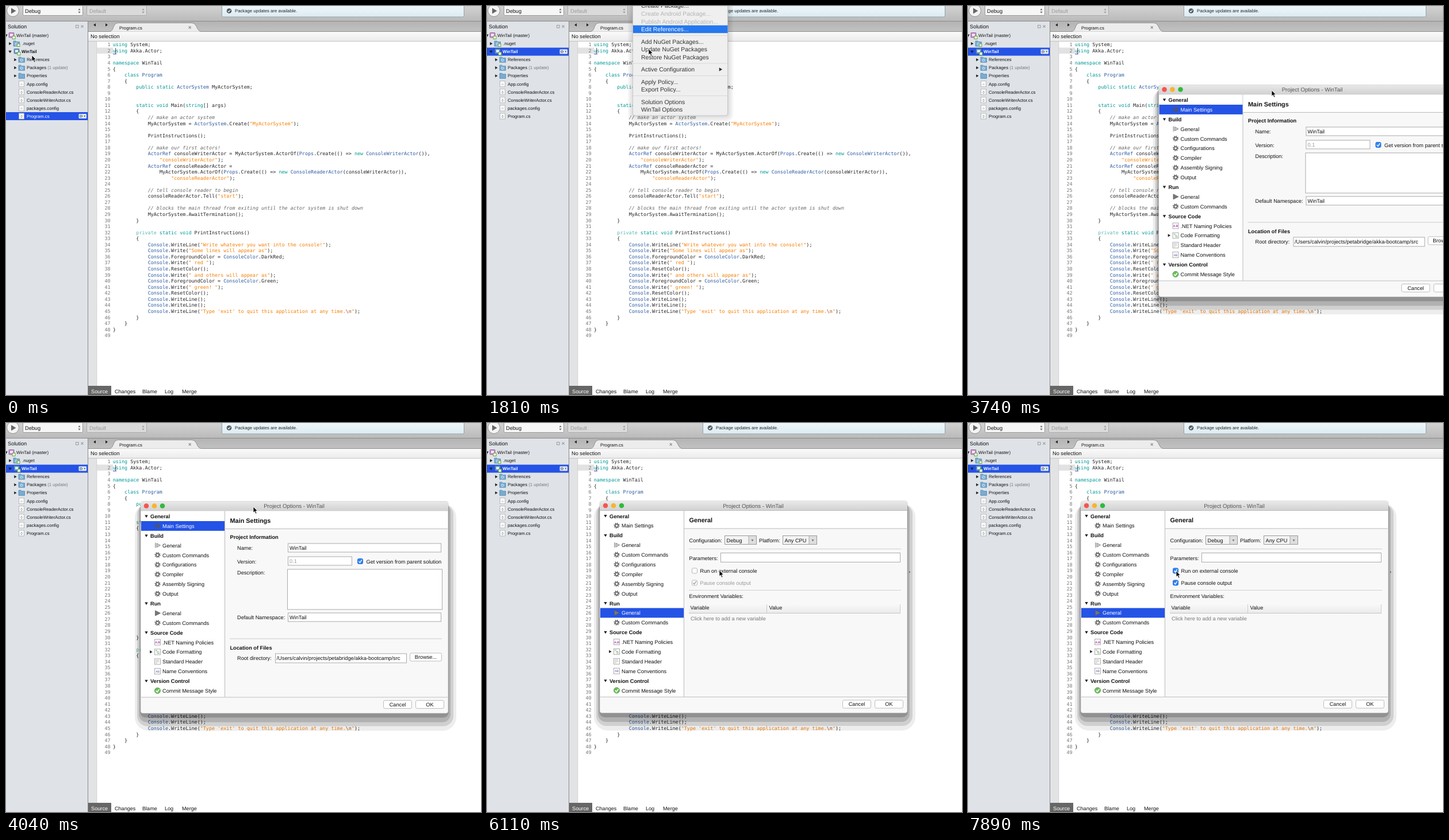
Animation of 826 by 678 pixels, one loop 8000 ms. Source, as an HTML page:

```html
<!DOCTYPE html>
<html lang="en">
<head>
<meta charset="utf-8">
<title>Project options</title>
<style>
  html, body { margin: 0; width: 100%; height: 100%; overflow: hidden; background: #fff; }
  svg { display: block; width: 100%; height: 100%; }
  text { font-family: "Liberation Sans", Arial, sans-serif; font-size: 9.2px; text-rendering: geometricPrecision; }
  .mono { font-family: "DejaVu Sans Mono", monospace; font-size: 8.42px; fill: #222; }
  .kw { fill: #009695; }
  .soft { fill: #58b8b6; }
  .type { fill: #2c5aa0; }
  .str { fill: #f57d00; }
  .esc { fill: #a04a00; }
  .note { fill: #666; font-style: italic; }
</style>
</head>
<body>
<svg id="stage" viewBox="0 0 826 678" xmlns="http://www.w3.org/2000/svg"></svg>
<script>
const LOOP = 8000;
const BLUE = '#2453e6';

// Drawing helpers, all returning SVG markup
const rect = (x, y, w, h, fill, extra = '') =>
  `<rect x="${x}" y="${y}" width="${w}" height="${h}" fill="${fill}" ${extra}/>`;
const text = (x, y, s, o = {}) =>
  `<text x="${x}" y="${y}" fill="${o.fill || '#111'}" style="font-size:${o.size || 9.2}px" ` +
  `font-weight="${o.bold ? 700 : 400}" text-anchor="${o.anchor || 'start'}" ${o.attr || ''}>${s}</text>`;
const path = (d, fill = 'none', stroke = 'none', width = 1) =>
  `<path d="${d}" fill="${fill}" stroke="${stroke}" stroke-width="${width}"/>`;
const hline = (x1, x2, y, color) => rect(x1, y, x2 - x1, 1, color);
const right = (x, y, r = 2.6, fill = '#222') => path(`M${x - r * .7} ${y - r}L${x + r} ${y}L${x - r * .7} ${y + r}Z`, fill);
const down = (x, y, r = 2.7, fill = '#222') => path(`M${x - r} ${y - r * .7}H${x + r}L${x} ${y + r}Z`, fill);
const group = (id, body) => `<g id="${id}">${body}</g>`;
const gradient = (id, a, b) =>
  `<linearGradient id="${id}" x2="0" y2="1"><stop stop-color="${a}"/><stop offset="1" stop-color="${b}"/></linearGradient>`;
const field = (x, y, w, h, s = '', fill = '#111') =>
  rect(x + .5, y + .5, w - 1, h - 1, '#fff', 'stroke="#aaa"') + (s && text(x + 3, y + h / 2 + 3.4, s, { fill }));
const button = (x, y, w, s) =>
  rect(x + .5, y + .5, w - 1, 14, '#fff', 'rx="2.5" stroke="#bdbdbd"') +
  text(x + w / 2, y + 10.8, s, { anchor: 'middle' });
const checkbox = (x, y, on, enabled = true) =>
  rect(x + .5, y + .5, 9, 9, on && enabled ? '#2f83f2' : '#fff',
    `rx="2" stroke="${on && enabled ? '#2873dd' : '#b5b5b5'}"`) +
  (on ? path(`M${x + 2.5} ${y + 5}l2 2.4l3.3 -5`, 'none', enabled ? '#fff' : '#999', 1.3) : '');
const steppers = (x, y, color) =>
  path(`M${x - 2} ${y - 1.3}h4l-2 -3zM${x - 2} ${y + 1.3}h4l-2 3z`, color);

function toolbar() {
  return rect(0, 0, 826, 27, 'url(#bar)') + hline(0, 826, 26, '#8c8c8c') +
    `<circle cx="12" cy="8" r="10.5" fill="#f4f4f4" stroke="#909090"/>` +
    path('M9 3.5L17.5 8.5L9 13.5Z', '#666') +
    rect(29.5, -3, 104, 19.5, '#f6f6f6', 'rx="2" stroke="#999"') + text(33, 12, 'Debug') + steppers(127.5, 8.5, '#666') +
    rect(140.5, -3, 104, 19.5, '#dadada', 'rx="2" stroke="#aaa"') + text(145, 12, 'Default', { fill: '#999' }) + steppers(238.5, 8.5, '#999') +
    rect(375.5, -3, 421, 22, 'url(#banner)', 'rx="2" stroke="#8fa3ad"') +
    `<circle cx="388" cy="8.5" r="4.3" fill="#505860"/>` + path('M385.8 8.5l1.7 1.8l2.8 -3.6', 'none', '#fff', 1.1) +
    text(398, 11.3, 'Package updates are available.', { size: 7.75, fill: '#222' });
}

const rowY = i => 51.5 + i * 14.05;
const folder = (x, y, dot) =>
  path(`M${x - 5} ${y - 4.5}h4l1 1.5h5.5v7.5h-10.5z`, '#78acd2', '#5286ae', .8) +
  (dot ? `<circle cx="${x}" cy="${y + .8}" r="2" fill="none" stroke="#e3f0fa"/>` : '');
const file = (x, y, mark) =>
  rect(x - 4.5, y - 5, 9, 10, '#fafafa', 'stroke="#aaa" stroke-width=".8"') +
  text(x, y + 2, mark, { size: 5.5, fill: '#777', anchor: 'middle' });

function projectIcon(x, y, color) {
  return rect(x - 5, y - 5, 9, 8.5, color, 'rx="1" stroke="#667" stroke-width=".7"') +
    rect(x - 3, y - 3, 5, 4, '#e9f2fa') + rect(x + 1, y + 1, 5, 5, '#f4ffe8', 'stroke="#67a23c" stroke-width="1"');
}

function selectionBar(id, y) {
  return group(id, rect(0, y - 7, 142, 14, BLUE) + rect(126.5, y - 4, 13.5, 8, '#dfe7fb', 'rx="1"') +
    `<circle cx="130.5" cy="${y}" r="1.8" fill="none" stroke="#555" stroke-width="1.4" stroke-dasharray="1 .5"/>` +
    down(136.8, y, 1.5, '#555'));
}

function sidebar() {
  const small = (x, i, s, o = {}) => text(x, rowY(i) + 2.7, s, { size: 7.75, ...o });
  const files = ['App.config', 'ConsoleReaderActor.cs', 'ConsoleWriterActor.cs', 'packages.config', 'Program.cs'];
  let s = rect(0, 27, 142, 651, '#dfe3e8') + text(3, 39.3, 'Solution') +
    rect(121.5, 33.5, 4.5, 4.5, 'none', 'stroke="#999"') + path('M130.5 33.7l4 4m0 -4l-4 4', 'none', '#999', 1.1) +
    selectionBar('selFile', rowY(10)) + selectionBar('selProject', rowY(2)) +
    down(0, rowY(0)) + projectIcon(10, rowY(0), '#dc7fd0') + small(18, 0, 'WinTail (master)') +
    right(7, rowY(1)) + folder(18, rowY(1), true) + rect(19.5, rowY(1) + .5, 4.5, 4.5, '#f4ffe8', 'stroke="#67a23c"') + small(28, 1, '.nuget') +
    down(7, rowY(2)) + projectIcon(19, rowY(2), '#5a9bd0') +
    small(27, 2, 'WinTail', { bold: true, size: 7.65, attr: 'id="projectName"' });
  ['References', 'Packages <tspan fill="#777">(1 update)</tspan>', 'Properties'].forEach((name, k) => {
    const y = rowY(k + 3);
    s += right(16, y) + folder(27, y, k < 2) + small(36, k + 3, name);
  });
  files.forEach((name, k) => {
    s += file(27, rowY(k + 6), name.endsWith('cs') ? '{}' : '‹›') +
      small(36, k + 6, name, { attr: k === 4 ? 'id="fileName"' : '' });
  });
  return s + rect(142, 27, 1, 651, '#8a8a8a');
}

const source = `using System;
using Akka.Actor;

namespace WinTail
{
    class Program
    {
        public static ActorSystem MyActorSystem;


        static void Main(string[] args)
        {
            // make an actor system
            MyActorSystem = ActorSystem.Create("MyActorSystem");

            PrintInstructions();

            // make our first actors!
            ActorRef consoleWriterActor = MyActorSystem.ActorOf(Props.Create(() => new ConsoleWriterActor()),
                "consoleWriterActor");
            ActorRef consoleReaderActor =
                MyActorSystem.ActorOf(Props.Create(() => new ConsoleReaderActor(consoleWriterActor)),
                    "consoleReaderActor");

            // tell console reader to begin
            consoleReaderActor.Tell("start");

            // blocks the main thread from exiting until the actor system is shut down
            MyActorSystem.AwaitTermination();
        }

        private static void PrintInstructions()
        {
            Console.WriteLine("Write whatever you want into the console!");
            Console.Write("Some lines will appear as");
            Console.ForegroundColor = ConsoleColor.DarkRed;
            Console.Write(" red ");
            Console.ResetColor();
            Console.Write(" and others will appear as");
            Console.ForegroundColor = ConsoleColor.Green;
            Console.Write(" green! ");
            Console.ResetColor();
            Console.WriteLine();
            Console.WriteLine();
            Console.WriteLine("Type 'exit' to quit this application at any time.\\n");
        }
    }
}
`;
const tokens = /(?<note>\/\/.*)|(?<str>"[^"]*")|\b(?:(?<soft>private)|(?<kw>using|namespace|class|public|static|void|string|new)|(?<type>Program|ActorSystem|ActorRef|Props|ConsoleWriterActor|ConsoleReaderActor|ConsoleColor|Console))\b/g;

function paint(line) {
  return line.replace(tokens, (word, ...rest) => {
    const kind = Object.entries(rest.at(-1)).find(([, v]) => v)[0];
    return `<tspan class="${kind}">${word.replace('\\n', '<tspan class="esc">\\n</tspan>')}</tspan>`;
  });
}

function editor() {
  let s = rect(143, 27, 683, 18, 'url(#tabs)') +
    path('M152 33l4 -2.8v5.6zM177 33l-4 -2.8v5.6z', '#222') +
    path('M143 44.5H180C188 44.5 185 29.5 195 29.5H323C333 29.5 331 44.5 340 44.5H826', '#ececec', '#8f8f8f') +
    text(197, 40.8, 'Program.cs', { size: 7.8 }) + path('M317.7 35.3l4 4m0 -4l-4 4', 'none', '#888', 1.2) +
    rect(143, 45, 683, 16, 'url(#crumb)') + text(147, 56.3, 'No selection') + hline(143, 826, 61, '#c4c4c4') +
    rect(143, 62, 683, 616, '#fff') + rect(143, 62, 15, 600, '#e1e3e5') + rect(157.5, 62, .7, 600, '#c8c8c8') +
    rect(158, 72.5, 28, 10.5, '#e2e2e2');
  source.split('\n').forEach((line, i) => {
    const y = 70.3 + i * 10.56, indent = line.search(/\S|$/);
    s += `<text class="mono" x="181.5" y="${y}" text-anchor="end" style="fill:#777">${i + 1}</text>` +
      `<text class="mono" x="${185.8 + indent * 5.07}" y="${y}">${paint(line.trim())}</text>`;
  });
  s += rect(186, 83, 6, 1.2, '#5252dd') + rect(190.3, 73, .9, 10, '#333');
  s += rect(143, 662, 40, 16, '#666') + text(148, 675, 'Source', { fill: '#fff' });
  [[189, 'Changes'], [237, 'Blame'], [276, 'Log'], [306, 'Merge']].forEach(([x, name]) => s += text(x, 675, name, { size: 9.1 }));
  return s;
}

const menuItems = [[-.5, 'Create Package...'], [13.5, 'Create Android Package...', 1], [27, 'Publish Android Application...', 1],
  [40.5, 'Edit References...'], [62, 'Add NuGet Packages...'], [75.5, 'Update NuGet Packages'], [89, 'Restore NuGet Packages'],
  [110.5, 'Active Configuration'], [132, 'Apply Policy...'], [145.5, 'Export Policy...'], [167, 'Solution Options'], [180.5, 'WinTail Options']];

function menu() {
  let s = [9, 6, 3, 1].map(d => rect(254 - d, -20, 165 + 2 * d, 211 + d * 1.2, '#000', `rx="${4 + d}" opacity=".04"`)).join('') +
    rect(253.5, -20, 165, 211, '#efefef', 'rx="4" stroke="#bcbcbc" stroke-width=".7"') +
    `<rect id="menuBar" x="254" width="164.5" height="13.5" fill="#2578ee"/>`;
  [51, 99.5, 121, 156].forEach(y => s += hline(254, 418, y, '#d9d9d9'));
  menuItems.forEach(([y, name, off]) =>
    s += text(268, y + 3.5, name, { size: 10.4, fill: off ? '#b4b4b4' : '#333', attr: 'class="item"' }));
  return group('menu', s + right(406, 110.5, 3.2, '#333'));
}

const optionRows = ['#General', 'gear Main Settings', '#Build', 'build General', 'gear Custom Commands', 'gear Configurations',
  'gear Compiler', 'gear Assembly Signing', 'gear Output', '#Run', 'play General', 'gear Custom Commands', '#Source Code',
  'ab .NET Naming Policies', 'tree Code Formatting', 'doc Standard Header', 'ab2 Name Conventions', '#Version Control', 'done Commit Message Style'];
const optionY = i => 162 + i * 16.89;

const sheet = y => rect(220.5, y - 5, 10, 10, '#fafafa', 'stroke="#a5a5a5" stroke-width=".9"');
const icons = {
  gear: y => `<g fill="none" stroke="#555"><circle cx="225.5" cy="${y}" r="2.6" stroke-width="1.4"/>` +
    `<circle cx="225.5" cy="${y}" r="4.1" stroke-width="2" stroke-dasharray="1.4 1.82"/></g>`,
  build: y => rect(221.2, y - 4.5, 1.2, 9, '#888') + path(`M224 ${y - 3.5}l6.5 3.5l-6.5 3.5z`, '#ccc', '#777', .8),
  play: y => path(`M221.5 ${y - 4.5}l9 4.5l-9 4.5z`, '#777', '#555', .7),
  ab: y => sheet(y) + text(225.5, y + 2, 'A.B', { size: 5, fill: '#b03aa5', anchor: 'middle', bold: true }),
  ab2: y => sheet(y) + text(225.5, y + 2, 'AB', { size: 5, fill: '#4d62b5', anchor: 'middle' }),
  tree: y => right(214, y) + sheet(y) + path(`M222 ${y - 2.5}h3M224 ${y}h4M225 ${y + 2.5}h4`, 'none', '#6a9a6a', .9),
  doc: y => sheet(y) + path(`M222 ${y - 2.5}h6M222 ${y}h6M222 ${y + 2.5}h3`, 'none', '#aaa', .8),
  done: y => `<circle cx="225.5" cy="${y}" r="5" fill="#6cbf58" stroke="#4c9440" stroke-width=".8"/>` +
    path(`M222.8 ${y}l2.2 2.4l3.4 -4.6`, 'none', '#fff', 1.6)
};

function mainPanel() {
  const heading = (y, s) => text(351.5, y, s, { bold: true });
  return text(351.5, 173, 'Main Settings', { bold: true, size: 10.9 }) + heading(201.8, 'Project Information') +
    text(364, 220.7, 'Name:') + field(452, 209, 267, 16, 'WinTail') +
    text(364, 244, 'Version:') + field(452, 232, 112, 16, '0.1', '#999') +
    checkbox(573, 235.5, true) + text(588.5, 244, 'Get version from parent solution') +
    text(364, 263, 'Description:') + field(451, 254, 270, 71) +
    text(364, 341.7, 'Default Namespace:') + field(452, 330, 267, 16, 'WinTail') +
    hline(351, 720, 375, '#ccc') + heading(394, 'Location of Files') + text(364, 412.8, 'Root directory:') +
    field(430, 401, 229, 17) +
    `<g clip-path="url(#pathClip)">${text(432.5, 412.8, '/Users/calvin/projects/petabridge/akka-bootcamp/src', { size: 9.25 })}</g>` +
    button(664, 400, 56, 'Browse...');
}

function runPanel() {
  const select = (x, w, s) => rect(x + .5, 196.5, w, 15, '#f4f4f4', 'stroke="#999"') + text(x + 3.5, 207.5, s) +
    rect(x + w - 13, 197, 13, 14, '#dedede') + rect(x + w - 13.5, 197, 1, 14, '#aaa') + down(x + w - 6.5, 204.5, 2, '#777');
  return text(351.5, 173, 'General', { bold: true, size: 10.9 }) +
    text(351.5, 207.5, 'Configuration:') + select(413, 55, 'Debug') + text(473, 207.5, 'Platform:') + select(514, 59, 'Any CPU') +
    hline(351, 720, 219, '#d0d0d0') + text(351.5, 238.7, 'Parameters:') + field(406, 226, 313, 17) +
    text(370.5, 260.5, 'Run on external console') +
    group('unchecked', checkbox(356, 252.5, false) + checkbox(356, 273.5, true, false)) +
    group('checked', checkbox(356, 252.5, true) + checkbox(356, 273.5, true)) +
    text(370.5, 281.7, 'Pause console output', { attr: 'id="pause"' }) +
    hline(351, 720, 291, '#d0d0d0') + text(351.5, 305.3, 'Environment Variables:') +
    rect(351, 314, 368, 17, 'url(#crumb)') + hline(351, 719, 331, '#c4c4c4') + rect(486, 316, 1, 15, '#ccc') + rect(718, 316, 1, 15, '#ccc') +
    text(353.5, 325.2, 'Variable') + text(490.5, 325.2, 'Value') +
    text(354, 343.5, 'Click here to add a new variable', { fill: '#777' });
}

function dialog() {
  const shadow = [[186, 140, 745, 536, 24, .07], [190, 141, 740, 528, 18, .12], [193, 140, 735, 521, 14, .15], [195, 138, 732, 513, 10, .18]];
  let s = shadow.map(([x, y, x2, y2, r, a]) => rect(x, y, x2 - x, y2 - y, '#000', `rx="${r}" opacity="${a}"`)).join('') +
    rect(196, 136, 535, 369.5, '#f8f8f8', 'rx="4" stroke="#aaa" stroke-width=".6"') +
    path('M196 152V140Q196 136 200 136H727Q731 136 731 140V152Z', 'url(#title)') + hline(196, 731, 152, '#bbb');
  ['#f5554f', '#f6b52e', '#31b93d'].forEach((c, i) => s += `<circle cx="${206 + 14 * i}" cy="144" r="4.3" fill="${c}"/>`);
  s += text(463, 147.7, 'Project Options - WinTail', { size: 9.67, fill: '#555', anchor: 'middle' }) +
    rect(197, 153, 145, 324, '#fff') + rect(342, 153, 1, 324, '#bbb') + rect(343, 153, 387, 30, '#fff') + hline(343, 730, 183.5, '#bdbdbd') +
    `<rect id="optionBar" x="197" width="145" height="16.9" fill="${BLUE}"/>`;
  optionRows.forEach((row, i) => {
    const y = optionY(i), [kind, ...words] = row.split(' ');
    s += row[0] === '#' ? down(206, y) + text(213, y + 3.5, row.slice(1), { bold: true })
      : icons[kind](y) + text(234, y + 3.5, words.join(' '), { attr: `id="option${i}"` });
  });
  return group('dialog', s + group('main', mainPanel()) + group('run', runPanel()) +
    hline(197, 730, 477, '#c0c0c0') + button(618, 482.5, 50, 'Cancel') + button(674, 482.5, 50, 'OK'));
}

const defs = '<defs>' + gradient('bar', '#d2d2d2', '#b9b9b9') + gradient('banner', '#f0f8fb', '#dcebf1') + gradient('tabs', '#b4b4b4', '#c2c2c2') +
  gradient('crumb', '#fafafa', '#ebebeb') + gradient('title', '#e9e9e9', '#d2d2d2') +
  '<clipPath id="pathClip"><rect x="431" y="402" width="226" height="15"/></clipPath></defs>';
const pointer = group('pointer', path('M0 0V10.2L2.4 8L4.2 12.2L6 11.4L4.2 7.4H7.4Z', '#000', '#fff', .8));
document.getElementById('stage').innerHTML = defs + toolbar() + sidebar() + editor() + menu() + dialog() + pointer;

// Held poses: [start ms, ...values]
const pointerPath = [[0, 45, 86], [140, 44, 82], [290, 43, 78], [600, 82, 74], [750, 142, 66], [900, 205, 54], [1060, 246, 45],
  [1210, 262, -20], [1810, 281, 75], [1960, 287, 104], [2110, 296, 136], [2250, 306, 165], [2400, 311, 181],
  [3150, 345, 176], [3300, 410, 166], [3440, 475, 155], [3590, 515, 149], [3740, 528, 147], [3890, 490, 146], [4040, 430, 146],
  [4190, 392, 145], [4630, 341, 233], [4780, 300, 365], [4930, 276, 452], [5080, 264, 400], [5220, 258, 340], [5370, 257, 328],
  [5660, 290, 312], [5810, 340, 285], [5960, 385, 265], [6110, 404, 257], [6410, 396, 257], [6710, 383, 257], [6860, 373, 258],
  [7000, 366, 258], [7150, 362, 258]];
const menuFade = [[0, 0], [1510, 1], [2700, .85], [2850, .55], [3000, 0]];
const menuPick = [[0, -1], [1810, 3], [1960, 6], [2110, 8], [2250, 10], [2400, 11], [2700, -1]];
const dialogShift = [[0, 135.5, 1.5], [3890, 98, 1], [4040, 38, .5], [4190, 0, 0]];
const at = (poses, t) => poses.findLast(p => p[0] <= t).slice(1);

const $ = id => document.getElementById(id);
const show = (id, on) => $(id).style.display = on ? '' : 'none';
const items = [...document.querySelectorAll('.item')];

function draw(t) {
  const picked = t >= 290, run = t >= 5370, checked = t >= 7450;
  show('selFile', !picked);
  show('selProject', picked);
  $('fileName').style.fill = picked ? '#111' : '#fff';
  $('projectName').style.fill = picked ? '#fff' : '#111';

  const [fade] = at(menuFade, t), [pick] = at(menuPick, t);
  $('menu').setAttribute('opacity', fade);
  show('menuBar', pick >= 0);
  if (pick >= 0) $('menuBar').setAttribute('y', menuItems[pick][0] - 6.8);
  items.forEach((item, i) => item.style.fill = i === pick ? '#fff' : '');

  show('dialog', t >= 3150);
  $('dialog').setAttribute('transform', `translate(${at(dialogShift, t)})`);
  show('main', !run);
  show('run', run);
  $('optionBar').setAttribute('y', optionY(run ? 10 : 1) - 8.4);
  $('option1').style.fill = run ? '#111' : '#fff';
  $('option10').style.fill = run ? '#fff' : '#111';
  show('unchecked', !checked);
  show('checked', checked);
  $('pause').style.fill = checked ? '#111' : '#999';

  $('pointer').setAttribute('transform', `translate(${at(pointerPath, t)})`);
}

const start = performance.now();
function tick() {
  draw((performance.now() - start) % LOOP);
  requestAnimationFrame(tick);
}
tick();
</script>
</body>
</html>
```
